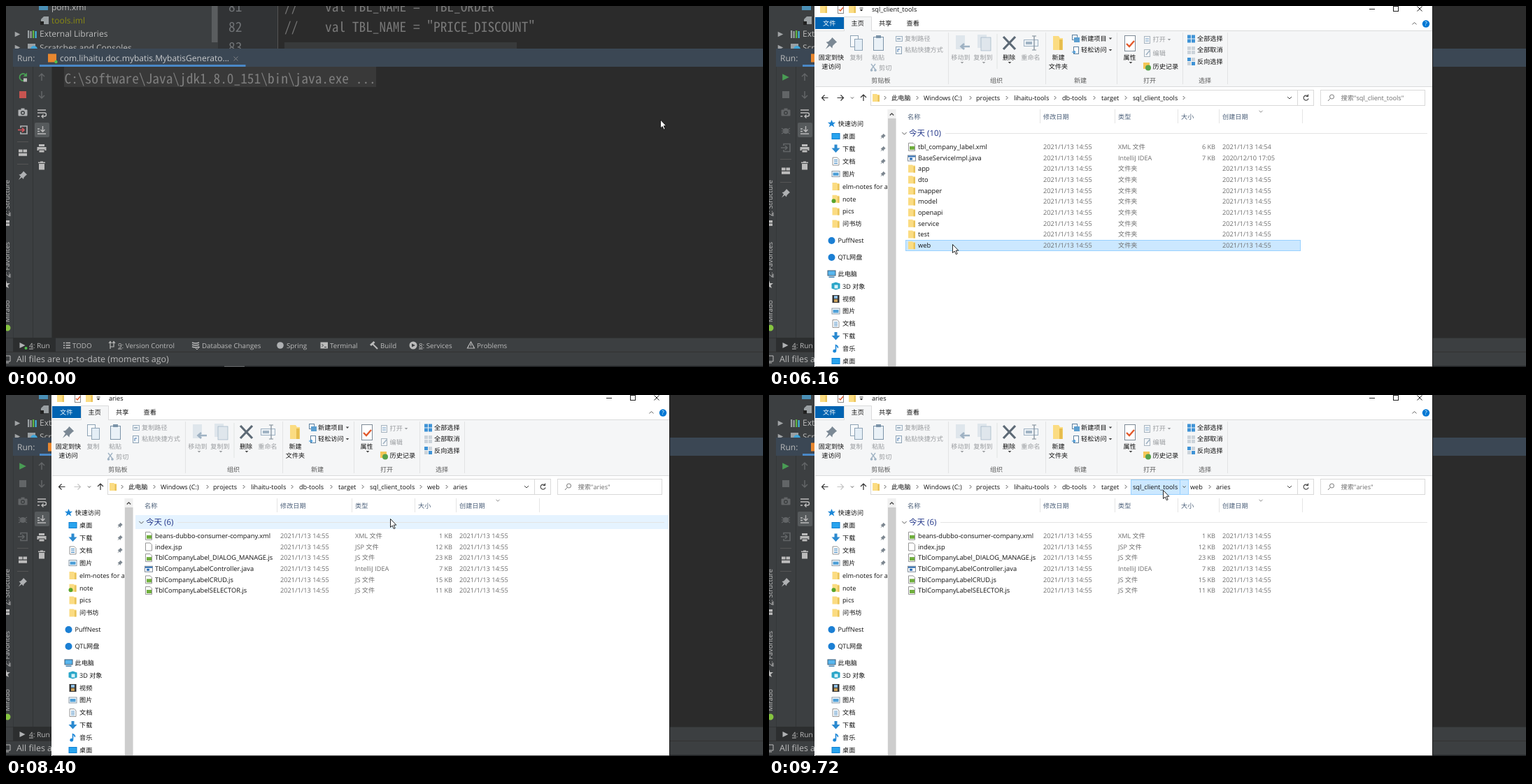
An HTML page for the animation above (9.8 s loop, 1082x517 px).

```html
<!DOCTYPE html>
<html lang="zh-CN">
<head>
<meta charset="utf-8">
<title>Generator run</title>
<style>
html, body { margin: 0; width: 100%; height: 100%; overflow: hidden; background: #2b2b2b; }
svg { display: block; width: 1082px; height: 517px; }
text { font-family: "Open Sans", "Noto Sans CJK SC", "Noto Sans CJK", sans-serif; white-space: pre; text-rendering: geometricPrecision; }
.mono { font-family: "Noto Sans Mono CJK SC", "Noto Sans Mono CJK JP", "Noto Sans CJK", monospace; font-weight: 300; }
</style>
</head>
<body>
<svg id="stage" viewBox="0 0 1082 517" xmlns="http://www.w3.org/2000/svg"></svg>
<script>
const LOOP = 9800, STEP = 40;
const CELL = 9.685, LINE = 29.05, ROW = 15.65;
const LIGHT = '#bbbbbb', OUTPUT = '#adadad', DIM = '#626567', INK = '#111', GRAY = '#6d6d6d', FAINT = '#9a9da0';
const SKY = '#1e88d8', GREEN = '#499c54';

const esc = s => s.replace(/&/g, '&amp;').replace(/</g, '&lt;');
const rect = (x, y, w, h, fill, more = '') => `<rect x="${x}" y="${y}" width="${w}" height="${h}" fill="${fill}" ${more}/>`;
const box = (x, y, w, h, fill, stroke) => rect(x + .5, y + .5, w - 1, h - 1, fill, `stroke="${stroke}"`);
const disc = (x, y, r, fill) => `<circle cx="${x}" cy="${y}" r="${r}" fill="${fill}"/>`;
const line = (d, color, w = 1, more = '') => `<path d="${d}" fill="none" stroke="${color}" stroke-width="${w}" ${more}/>`;
const shape = (d, fill, more = '') => `<path d="${d}" fill="${fill}" ${more}/>`;
const at = (x, y, art) => `<g transform="translate(${x} ${y})">${art}</g>`;
// y is the vertical middle of the text
const text = (x, y, s, fill = INK, size = 9.15, more = '') =>
  `<text x="${x}" y="${y + size * .36}" font-size="${size}" fill="${fill}" ${more}>${esc(s)}</text>`;
const mid = 'text-anchor="middle"', right = 'text-anchor="end"';
const mono = (x, y, s, fill) => text(x, y, s, fill, CELL * 2, 'class="mono"');

const folder = (x, y) => at(x, y, shape('M-5 -5.5H1L2 -4.5H5V5.5H-5Z', '#fbdc82') + rect(2.5, -3.5, 2.5, 9, '#e9c35a'));
const sheet = (x, y) => at(x, y, shape('M-4.5 -5.5H2L4.5 -3V5.5H-4.5Z', '#fff', 'stroke="#8a8a8a" stroke-width=".9"'));
const codeSheet = (x, y) => sheet(x, y) + rect(x - 3, y - 1, 7, 5, '#6fae3c');
const program = (x, y) => box(x - 6, y - 4, 12, 9, '#fff', '#7f8b97') + rect(x - 5, y - 3, 10, 2, '#2f6fb5') + rect(x - 3, y, 4, 3, '#2f6fb5');
const chevron = (x, y, c = '#555') => line(`M${x - 1.3} ${y - 2.5}l2.5 2.5l-2.5 2.5`, c);
const downV = (x, y, c = '#555', r = 3) => line(`M${x - r} ${y - r / 2}l${r} ${r}l${r} ${-r}`, c);
const caret = (x, y, c = '#444') => shape(`M${x - 2.3} ${y - 1}h4.6l-2.3 2.6z`, c);
const triangle = (x, y, s, c) => shape(`M${x - s} ${y - s}L${x + s} ${y}L${x - s} ${y + s}Z`, c);

/* ---------- IDE ---------- */
const outputLines = [
  'java文件中的dto、service等命名前缀——TblCompanyLabel',
  '正在匹配表名:TBL_COMPANY_LABEL',
  '1 db_aries_company.TBL_COMPANY_LABEL',
  '',
  '匹配到唯一表 db_aries_company.TBL_COMPANY_LABEL',
  '您的选择为1 db_aries_company.TBL_COMPANY_LABEL',
  '表注释:企业标签表',
  '匹配到db_aries_company对应的包名com.zhihuishu.aries.company',
  '扩展包名 company',
  '-'.repeat(14) + '生成中' + '-'.repeat(18),
  '临时文件生成至： C:\\projects\\lihaitu-tools\\db-tools\\target\\sql_client_tools'
];

function projectAndEditor() {
  return rect(0, 0, 303, 62, '#3c3f41') + rect(294, 0, 8.5, 52, '#5a5d5f')
    + rect(47, -5, 13, 11, '#4a8fb5') + text(65, 1.5, 'pom.xml', LIGHT, 12)
    + shape('M54 15H61V26H50V19Z', '#9aa0a3') + rect(49, 22, 5, 5, '#222') + text(65, 20.5, 'tools.iml', '#8a8a12', 12)
    + triangle(16.5, 40.5, 3.8, '#a0a3a5') + [31, 34.5, 38, 41.5].map((x, i) => rect(x, 35 + i % 2, 2.2, 11 - i % 2, i < 2 ? '#9aa0a3' : i < 3 ? '#62b543' : '#40b6e0')).join('')
    + text(48, 40, 'External Libraries', LIGHT, 12)
    + triangle(16.5, 59.5, 3.8, '#a0a3a5') + rect(31, 54, 11, 10, '#9aa0a3') + disc(40, 62, 5, '#40a5d8')
    + text(48, 59.5, 'Scratches and Consoles', LIGHT, 12)
    + rect(303, 0, 85, 62, '#313335') + rect(388, 0, 1, 62, '#555') + rect(398, 52, 332, 10, '#383a3b')
    + ['81', '82', '83'].map((n, i) => mono(318, 1 + i * 29, n, '#707376')).join('')
    + mono(398, 1, '//    val TBL_NAME = "TBL_ORDER"', '#787878')
    + mono(398, 30, '//    val TBL_NAME = "PRICE_DISCOUNT"', '#787878');
}

const camera = c => rect(-6.5, -3.5, 13, 9, c, 'rx="1"') + rect(-2.5, -5.5, 5, 3, c) + disc(0, 1, 3, '#3c3f41') + disc(0, 1, 1.6, c);
const exitDoor = (c, arrow) => line('M-3 -3V-5.5H6V5.5H-3V3', c, 1.7) + line('M-7 0H2M-1 -3L2 0L-1 3', arrow, 1.6);
const bug = c => disc(0, 1, 4, c) + line('M-6 -3L6 5M6 -3L-6 5M-6 1H6', c, 1.2);
const layout = rect(-6, -4.5, 5.5, 4, LIGHT) + rect(.5, -4.5, 5.5, 4, LIGHT) + rect(-6, .8, 12, 4, LIGHT);
const pushPin = c => shape('M1 -6L6 -1L4.5 0L1.5 3L1 5.5L-1.5 3L-6 6.5L-3 1.5L-5.5 -1L-3 -1.5L0 -4.5Z', c);
const arrowUp = line('M0 5V-5M-4 -1L0 -5L4 -1', DIM, 1.5);

function runToolbar(running) {
  const left = running
    ? at(24, 102, line('M4 -3.5A5 5 0 1 0 5 2', GREEN, 1.8) + shape('M6 -6.5V-1H.5Z', GREEN) + rect(1, 1.5, 5, 5, LIGHT))
      + rect(19, 122, 10, 10, '#c75450') + at(24, 152, camera('#afb1b3')) + at(24, 177.5, exitDoor('#afb1b3', '#db5860'))
      + rect(16, 194, 16, 1, '#555') + at(24, 210, layout) + rect(16, 226, 16, 1, '#555') + at(24, 242.5, pushPin('#afb1b3'))
    : triangle(24, 102, 4.8, GREEN) + rect(19, 122, 10, 10, DIM) + at(24, 152, camera(DIM)) + at(24, 178, bug(DIM))
      + at(24, 203, exitDoor(DIM, DIM)) + rect(16, 219, 16, 1, '#555') + at(24, 236, layout)
      + rect(16, 252, 16, 1, '#555') + at(24, 268, pushPin('#afb1b3'));
  return left + at(51, 102, arrowUp) + at(51, 127, `<g transform="scale(1 -1)">${arrowUp}</g>`)
    + at(51, 153, line('M-6 -4H6M-6 0H4A2.5 2.5 0 0 1 4 5H0M2.5 2.5L0 5L2.5 7.5M-6 5H-3', LIGHT, 1.4))
    + rect(41, 167, 21, 21, '#565a5c', 'rx="2"')
    + at(51, 178, line('M-6 5H6M-6 -2H-3M-6 1.5H-3M1.5 -6V2M-1.5 -1L1.5 2L4.5 -1', LIGHT, 1.4))
    + at(51, 204, rect(-4, -6, 8, 3, LIGHT) + rect(-6.5, -2, 13, 5, LIGHT) + rect(-4, 2, 8, 4, LIGHT, 'stroke="#3c3f41"'))
    + at(51, 228.5, rect(-5, -5, 10, 1.6, LIGHT) + rect(-2, -6, 4, 2, LIGHT) + rect(-4, -2.5, 8, 8.5, LIGHT));
}

function sideStripe() {
  const up = (y, s) => `<g transform="translate(4.5 ${y}) rotate(-90)"><text font-size="9.6" fill="${LIGHT}">${s}</text></g>`;
  return up(301, '<tspan text-decoration="underline">Z</tspan>: Structure') + rect(0, 307, 5, 3.4, LIGHT) + rect(0, 311.5, 5, 3.4, LIGHT)
    + up(389, '<tspan text-decoration="underline">2</tspan>: Favorites') + shape('M0 393L1.5 397H6L2.5 400L4 404L0 402Z', LIGHT)
    + up(453, 'Mirado') + disc(2, 461, 4.5, '#86c440');
}

function bottomBar(running) {
  const label = (x, s) => text(x, 486, s, LIGHT, 9.75);
  const keyed = (x, key, s, size = 9.75) => `<text x="${x}" y="489.6" font-size="${size}" fill="${LIGHT}"><tspan text-decoration="underline">${key}</tspan>${s}</text>`;
  return rect(0, 475, 1082, 42, '#3c3f41') + rect(0, 475, 1082, 1, '#323435') + rect(10, 475, 61, 20, '#2c2e2f')
    + triangle(23.5, 486, 4, '#afb1b3') + (running ? disc(28.5, 490, 2, '#4fc04f') : '') + keyed(33, '4', ': Run', 10.1)
    + [482.5, 486, 489.5].map(y => line(`M82 ${y}h2M85.5 ${y}h6.5`, LIGHT, 1.3)).join('') + label(95, 'TODO')
    + line('M149 481V491M149 488H154V481M147 483L149 480.5L151 483M152 483L154 480.5L156 483', LIGHT, 1.2) + keyed(160, '9', ': Version Control')
    + [482, 485, 488].map(y => line(`M266 ${y}q5 2 10 0`, LIGHT, 1.5)).join('') + line('M271 490l2 2l4 -4', LIGHT) + label(280, 'Database Changes')
    + disc(392, 486, 4.8, '#afb1b3') + label(401, 'Spring')
    + rect(449.5, 481.5, 10.5, 9, LIGHT) + line('M451.5 484l2 2l-2 2M455 488.5h3', '#3c3f41') + label(463, 'Terminal')
    + line('M524 484L531 491', LIGHT, 2) + line('M521 486L526.5 481', LIGHT, 3) + label(535, 'Build')
    + disc(582, 486, 5.5, LIGHT) + triangle(582.5, 486, 2.5, '#3c3f41') + keyed(590, '8', ': Services')
    + shape('M664.5 481L669.5 490H659.5Z', 'none', `stroke="${LIGHT}" stroke-width="1.2"`) + rect(664, 484, 1, 3.5, LIGHT) + label(673, 'Problems')
    + rect(0, 495, 1082, 1, '#323232') + line('M0 501H6V509H0M0 511H4', LIGHT)
    + text(15, 506, 'All files are up-to-date (moments ago)', LIGHT, 12.44)
    + rect(0, 515.5, 1082, 1.5, '#1e2022') + rect(312, 515.5, 29, 1.5, '#5a5d5f');
}

function ide(t) {
  const running = t < 4160;
  return rect(0, 0, 1082, 517, '#2b2b2b') + projectAndEditor()
    + rect(0, 61, 66, 415, '#3c3f41') + rect(10, 61, 1072, 26, '#3b4754') + rect(0, 61, 10, 26, '#3c3f41')
    + rect(10, 87, 1, 388, '#353739') + rect(38, 87, 1, 388, '#323435') + rect(65, 87, 1, 388, '#323435')
    + text(16, 75, 'Run:', LIGHT, 12) + rect(48, 84, 294.5, 3, '#4a88c7')
    + rect(60, 68.5, 12, 12, '#e8872f') + (running ? disc(71.5, 80, 2.2, '#4fc04f') : '')
    + text(77, 75, 'com.lihaitu.doc.mybatis.MybatisGenerato...', '#c8cacc', 12)
    + line('M325.5 72.5l6 6m0 -6l-6 6', '#808386')
    + runToolbar(running) + sideStripe() + bottomBar(running)
    + rect(83, 87, 446, 29, '#393939') + mono(83.5, 104, 'C:\\software\\Java\\jdk1.8.0_151\\bin\\java.exe ...', '#7e7e7e')
    + (t >= 2000 ? outputLines.map((s, i) => mono(84, 104 + LINE * (i + 1), s, OUTPUT)).join('') : '');
}

/* ---------- file window ---------- */
const NOW = '2021/1/13 14:55';
const dir = name => ({ icon: folder, name, type: '文件夹', size: '' });
const file = (icon, name, type, size, made = NOW) => ({ icon, name, type, size: size + ' KB', made });
const lists = {
  sql_client_tools: [
    file(codeSheet, 'tbl_company_label.xml', 'XML 文件', 6, '2021/1/13 14:54'),
    file(program, 'BaseServiceImpl.java', 'IntelliJ IDEA', 7, '2020/12/10 17:05'),
    ...'app dto mapper model openapi service test web'.split(' ').map(dir)
  ],
  web: [dir('aries')],
  aries: [
    file(codeSheet, 'beans-dubbo-consumer-company.xml', 'XML 文件', 1),
    file(sheet, 'index.jsp', 'JSP 文件', 12),
    file(codeSheet, 'TblCompanyLabel_DIALOG_MANAGE.js', 'JS 文件', 23),
    file(program, 'TblCompanyLabelController.java', 'IntelliJ IDEA', 7),
    file(codeSheet, 'TblCompanyLabelCRUD.js', 'JS 文件', 15),
    file(codeSheet, 'TblCompanyLabelSELECTOR.js', 'JS 文件', 11)
  ]
};

const screenIcon = (x, y) => rect(x - 6, y - 4.5, 12, 9, '#0f7fd1') + rect(x - 5, y - 3.5, 10, 7, '#29a4ee');
const downIcon = (x, y) => shape(`M${x - 2} ${y - 6}h4v5h4l-6 6.5l-6 -6.5h4z`, '#2b8ad0');
const docIcon = (x, y) => sheet(x, y) + line(`M${x - 2.5} ${y - 2}h5m-5 2.5h5m-5 2.5h5`, '#3f86c0');
const picIcon = (x, y) => box(x - 6, y - 4.5, 12, 9, '#fff', '#8a9aa8') + rect(x - 4, y - 2, 8, 4.5, '#4fa0d8');
const pcIcon = (x, y) => box(x - 6, y - 5, 12, 8, '#58b6ee', '#3b5c78') + rect(x - 4, y + 4, 8, 1.5, '#3b7fb0');
const cubeIcon = (x, y) => shape(`M${x - 6} ${y - 4}l6 -2l6 2v7l-6 2l-6 -2z`, '#2aa6c8') + rect(x - 2, y - 2, 5, 5, '#d9f3fa');
const filmIcon = (x, y) => rect(x - 5, y - 5.5, 10, 11, '#333') + rect(x - 2.5, y - 4.5, 5, 4, '#8fc0e6') + rect(x - 2.5, y + .5, 5, 4, '#c9a05a');
const noteIcon = (x, y) => line(`M${x} ${y + 3}V${y - 5}q3 1 3 4`, SKY, 1.6) + disc(x - 1.8, y + 3.5, 2.4, SKY);
const starIcon = (x, y) => shape(`M${x} ${y - 5.5}l1.6 3.8h4l-3.2 2.6l1.4 4.2l-3.8 -2.5l-3.8 2.5l1.4 -4.2l-3.2 -2.6h4z`, SKY);
const okFolder = (x, y) => folder(x, y) + disc(x - 3, y + 3, 3, '#5aa52c');
const blueDot = (x, y) => disc(x, y, 5, '#1b7fd4');

const places = [
  [168.5, starIcon, '快速访问', 1], [186.5, screenIcon, '桌面'], [204.5, downIcon, '下载'], [222.5, docIcon, '文档'], [240.5, picIcon, '图片'],
  [258.5, folder, 'elm-notes for all'], [276.3, okFolder, 'note'], [294, folder, 'pics'], [312, folder, '问书坊'],
  [336, blueDot, 'PuffNest', 1], [360, blueDot, 'QTL网盘', 1], [383.5, pcIcon, '此电脑', 1],
  [401.5, cubeIcon, '3D 对象'], [419.5, filmIcon, '视频'], [437, picIcon, '图片'], [455, docIcon, '文档'],
  [473, downIcon, '下载'], [490.7, noteIcon, '音乐'], [508.5, screenIcon, '桌面']
];

function sidebar() {
  return places.map(([y, icon, name, top], i) => icon(top ? 89.5 : 95.5, y, 1) + text(top ? 98.5 : 105, y, name)
      + (i > 0 && i < 5 ? at(163, y, `<g transform="scale(.62)">${pushPin('#7d8790')}</g>`) : '')).join('')
    + rect(169.5, 148, 13, 369, '#fff') + rect(169.5, 148, 12, 369, '#f0f0f0') + rect(170, 161, 11.5, 356, '#cdcdcd')
    + line('M172.8 156.5l2.7 -2.7l2.7 2.7', '#444', 1.3);
}

function ribbon(on) {
  const ink = on ? INK : FAINT, soft = on ? '#3f8fd0' : '#9fb2c3';
  const pages = (x, y, c) => box(x - 9, y - 11, 12, 17, '#f7fafc', c) + box(x - 3, y - 6, 12, 17, '#e4eef6', c);
  const under = (x, s, c) => text(x, 73.5, s, c, 9.1, mid);
  const squares = (x, y, c) => [0, 1, 2, 3].map(i => rect(x + i % 2 * 6, y + (i >> 1) * 6 - 5.5, 5, 5, c)).join('');
  const sheetFill = on ? '#fbdc82' : '#dfe6ec';
  return rect(66, 36, 882, 79, '#f5f6f7') + rect(66, 115, 882, 1, '#dadbdc')
    + [256, 395, 497, 591, 655].map(x => rect(x, 38, 1, 74, '#e2e3e4')).join('')
    + [[160, '剪贴板'], [325, '组织'], [445, '新建'], [544, '打开'], [623, '选择']].map(([x, s]) => text(x, 107, s, '#5a5a5a', 9.1, mid)).join('')
    + at(89, 53, `<g transform="scale(1.35)">${pushPin('#7b8894')}</g>`) + under(89, '固定到快', INK) + text(89, 86.5, '速访问', INK, 9.1, mid)
    + pages(125, 53, on ? '#4a86b8' : '#8ea3b5') + under(124.5, '复制', ink)
    + box(149, 44, 15, 20, '#eaf1f7', '#7b93a8') + rect(153, 42, 7, 4, '#7b93a8') + under(156, '粘贴', FAINT)
    + box(181, 43, 10, 8, '#eef3f7', soft) + rect(183, 46, 5, 2, soft) + text(194, 46.5, '复制路径', ink)
    + box(181, 58, 9, 11, '#f0f5f9', '#8ea3b5') + line('M184 66v-4h3', '#4a78b0') + text(194, 63, '粘贴快捷方式', FAINT)
    + line('M146 83l6 8m0 -8l-6 8', soft, 1.3) + disc(146.5, 92, 1.8, soft) + disc(152, 92, 1.8, soft) + text(157, 88.5, '剪切', ink)
    + rect(267, 42, 13, 20, sheetFill) + line('M287 58H275M279 54L274.5 58L279 62', soft, 2.6) + under(274, '移动到', ink) + caret(276, 81, ink)
    + rect(298, 41, 13, 19, sheetFill) + rect(303, 45, 14, 19, sheetFill, `stroke="${soft}" stroke-width=".7"`) + under(306, '复制到', ink) + caret(307, 81, ink)
    + rect(325.5, 40, 1, 50, '#e2e3e4')
    + line('M335 44L352 62M352 44L335 62', on ? '#d3121c' : '#5d6a76', 3.2) + under(343, '删除', INK) + caret(344, 81)
    + box(364, 48, 21, 10, '#eef3f7', soft) + rect(367, 51, 9, 4, soft) + line('M376 43h6m-3 0v20m-3 0h6', on ? '#444' : '#7d8a96', 1.2) + under(374, '重命名', ink)
    + shape('M406 43h8l2 3h4v17h-14z', '#fbdc82') + rect(415, 48, 4.5, 15, '#e6bd4e') + under(413.5, '新建', INK) + text(413.5, 86.5, '文件夹', INK, 9.1, mid)
    + box(433, 41, 8, 8, '#fff', '#5b7f9e') + rect(436, 45, 8, 7, '#5c9fd0') + text(446, 46.5, '新建项目') + caret(488, 46.5)
    + box(435, 58, 8, 11, '#fff', '#5b7f9e') + line('M433 66h5l-2 -2m2 2l-2 2', SKY) + text(446, 63, '轻松访问') + caret(488, 63)
    + box(508, 42, 16, 23, '#fff', '#7d8a96') + line('M511 54l4 4l7 -8', '#e2592b', 2.4) + under(515.5, '属性', INK) + caret(517, 81)
    + (on ? rect(535, 44, 10, 9, '#f3c657') + line('M538 51h6', SKY, 2) : box(536, 43, 9, 11, '#f0f3f6', '#a9b5c0') + line('M538 47h5m-5 3h5', '#7fa8cc'))
    + text(548.5, 48, '打开', ink) + caret(572, 48, ink)
    + box(536, 62, 9, 11, '#f4f6f8', '#a9b5c0') + line('M539 70l5 -6', '#9fb2c3', 1.5) + text(548.5, 67.5, '编辑', FAINT)
    + rect(535, 81, 9, 9, '#f3c657') + disc(542, 88.5, 4, '#56a14a') + text(548.5, 86.5, '历史记录')
    + squares(598, 47, '#3f93d6') + text(612, 46.5, '全部选择')
    + squares(598, 63.5, '#cbd3da') + text(612, 63, '全部取消')
    + squares(598, 79.5, '#cbd3da') + rect(598, 74, 5, 5, '#3f93d6') + rect(604, 80, 5, 5, '#3f93d6') + text(612, 79.5, '反向选择');
}

const crumbs = [[175, '此电脑', 212], [221, 'Windows (C:)', 288], [296, 'projects', 340], [350, 'lihaitu-tools', 409],
  [419, 'db-tools', 465], [475, 'target', 510], [520, 'sql_client_tools', 593], [602, 'web', 630], [639, 'aries']];

function addressBar(where, mouse, pressed) {
  const over = mouse.x > 517 && mouse.x < 600 && mouse.y > 120 && mouse.y < 143;
  const [fill, edge] = pressed ? ['#cce8ff', '#99d1ff'] : ['#e5f3ff', '#cce8ff'];
  const count = { sql_client_tools: 7, web: 8, aries: 9 }[where];
  const arrow = (x, dirn, c) => line(`M${x - 4.5} 131.5h9M${x + dirn * .5} 127.5l${dirn * 4} 4l${-dirn * 4} 4`, c, 1.2);
  return arrow(80, -1, '#333') + arrow(102, 1, count === 7 ? '#333' : '#c4c4c4') + downV(119, 131.5, '#555', 2)
    + line('M135 136v-9M131 131l4 -4l4 4', '#333', 1.2)
    + box(145, 120, 634, 23, '#fff', '#d9d9d9') + rect(755, 121, 1, 21, '#d9d9d9') + downV(744, 131.5, '#444')
    + line('M770 129A3.5 3.5 0 1 0 771 132.5M770.5 126.5v3h-3', '#444', 1.1)
    + folder(153, 131.5) + chevron(166, 131.5)
    + (over ? box(517, 121, 71, 22, fill, edge) + box(587, 121, 13, 22, fill, edge) : '')
    + crumbs.slice(0, count).map(([x, s, end], i) => text(x, 131.5, s) + (!end ? '' : over && i === 6 ? downV(593.5, 131.5, '#444', 2) : chevron(end, 131.5))).join('')
    + box(788, 120, 150, 23, '#fff', '#d9d9d9') + `<circle cx="804.5" cy="130" r="3" fill="none" stroke="#777"/>` + line('M802 132.5l-3 3.5', '#777')
    + text(817.5, 131.5, `搜索"${where}"`, GRAY);
}

function listing(items, mouse, selected) {
  const inGroup = mouse.y >= 172 && mouse.y < 192;
  const hovered = Math.floor((mouse.y - 194) / ROW);
  const ruleStart = items.length > 9 ? 252 : 245;
  return (inGroup ? rect(185, 172, 762, 20, '#e5f3ff') : '')
    + downV(193.5, 182.5, '#555', 3.2) + text(200, 182, `今天 (${items.length})`, '#1e3287', 11.5) + rect(ruleStart, 182, 941 - ruleStart, 1, '#e4e4e4')
    + items.map((f, i) => {
      const y = 201.8 + i * ROW, top = Math.round(y - 7.8);
      return (i === selected ? box(195, top, 565, 16, '#cce8ff', '#99d1ff') : i === hovered ? rect(195, top, 565, 16, '#e5f3ff') : '')
        + f.icon(204, y) + text(213, y, f.name, INK, 9.3) + text(392, y, NOW, GRAY, 9.25) + text(499, y, f.type, GRAY)
        + text(638, y, f.size, GRAY, 9.1, right) + text(648, y, f.made || NOW, GRAY, 9.25);
    }).join('');
}

function columns(mouse, idle) {
  const over = idle && mouse.x > 495 && mouse.x < 584 && mouse.y >= 148 && mouse.y < 168;
  return (over ? rect(495, 148, 89, 20, '#d9ebf9') : '')
    + [387, 494, 584, 643, 762].map(x => rect(x, 148, 1, 20, '#e5e5e5')).join('')
    + [[198, '名称'], [392, '修改日期'], [499, '类型'], [589, '大小'], [648, '创建日期']].map(([x, s]) => text(x, 158.5, s, '#4c607a')).join('')
    + downV(703, 151, '#888', 2.5);
}

function explorer(t, mouse) {
  const where = t < 6600 ? 'sql_client_tools' : t < 7960 ? 'web' : 'aries';
  const title = t < 6400 ? 'sql_client_tools' : t < 7640 ? 'web' : 'aries';
  const busy = title !== where;
  const picked = t >= 6240 && t < 6600 || t >= 7560 && t < 7960;
  const selected = t >= 6160 && t < 6400 ? 9 : t >= 7400 && t < 7640 ? 0 : -1;
  return rect(65, 0, 883, 517, '#fff') + rect(948, 0, 1, 517, '#1f1f1f')
    + folder(78, 4.5) + box(98, -2, 9, 13, '#fff', '#8a8a8a') + line('M100 5l2 2l4 -5', '#e2592b', 1.5) + folder(119, 4.5)
    + rect(129.5, 2.5, 5, 1, '#333') + caret(132, 6, '#222') + text(147, 4.5, title)
    + rect(858, 4, 8, 1, '#222') + box(892, 0, 8, 8, '#fff', '#222') + line('M926.5 0.5l7 7m0 -7l-7 7', '#222')
    + ribbon(picked) + rect(66, 16, 41, 17, '#0063b1') + text(77, 24.5, '文件', '#fff')
    + rect(66, 35, 882, 1, '#dadbdc') + rect(107, 15, 40, 21, '#f5f6f7') + line('M107.5 36V15.5H146.5V36', '#dadbdc')
    + text(117.5, 24.5, '主页') + text(157, 24.5, '共享') + text(196.5, 24.5, '查看')
    + line('M919.5 26.5l3 -3l3 3', '#666') + disc(939, 25.5, 5.2, '#0078d4') + text(939, 25.5, '?', '#fff', 8, mid)
    + addressBar(where, mouse, t >= 9640) + sidebar() + columns(mouse, !busy && t >= 8320)
    + (busy ? text(566, 186, '正在处理...', GRAY, 9.1, mid) : listing(lists[where], mouse, selected))
    + rect(66, 516, 882, 1, '#555');
}

/* ---------- pointer ---------- */
const track = [[6160, 262, 341], [6240, 262, 341], [6400, 262, 345], [6640, 262, 345], [7080, 258, 208], [7240, 257, 206], [7480, 257, 206],
  [7800, 511, 153], [8000, 540, 143], [8160, 539, 143], [8320, 539, 143], [8480, 558, 211], [8720, 559, 211], [8800, 565, 197],
  [8960, 563, 152], [9120, 563, 150], [9480, 563, 136], [LOOP, 563, 136]];

function pointerAt(t) {
  if (t < 4160) return { x: 935, y: 162.5 };
  if (t < 6160) return { x: 831, y: 60 };
  const i = track.findIndex(k => k[0] > t);
  const [t0, x0, y0] = track[i - 1], [t1, x1, y1] = track[i];
  const k = (t - t0) / (t1 - t0);
  return { x: Math.round(x0 + (x1 - x0) * k), y: Math.round(y0 + (y1 - y0) * k) };
}

function pointer(t, { x, y }) {
  const busy = t >= 6400 && t < 6600 || t >= 7640 && t < 8000;
  const arrow = shape('M.5 .5V12.5L3.2 10L5.3 14.6L7.2 13.8L5.2 9.2H8.8Z', '#fff', 'stroke="#111" stroke-width=".9"');
  const spin = t / 1000 * 360 % 360;
  const ring = `<circle r="4.5" fill="#fff" stroke="${SKY}" stroke-width="2.4"/><g transform="rotate(${spin})">${line('M0 -4.5A4.5 4.5 0 0 1 4.5 0', '#6cc4f2', 2.4)}</g>`;
  return at(x, y, arrow + (busy ? at(10.5, .5, ring) : ''));
}

const stage = document.getElementById('stage');
let shown = '';
function update(now) {
  const t = Math.floor(now % LOOP / STEP) * STEP;
  const mouse = pointerAt(t);
  const scene = ide(t) + (t >= 4160 ? explorer(t, mouse) : '') + pointer(t, mouse);
  if (scene !== shown) stage.innerHTML = shown = scene;
}

const start = performance.now();
function frame() {
  update(performance.now() - start);
  requestAnimationFrame(frame);
}
frame();
</script>
</body>
</html>
```
